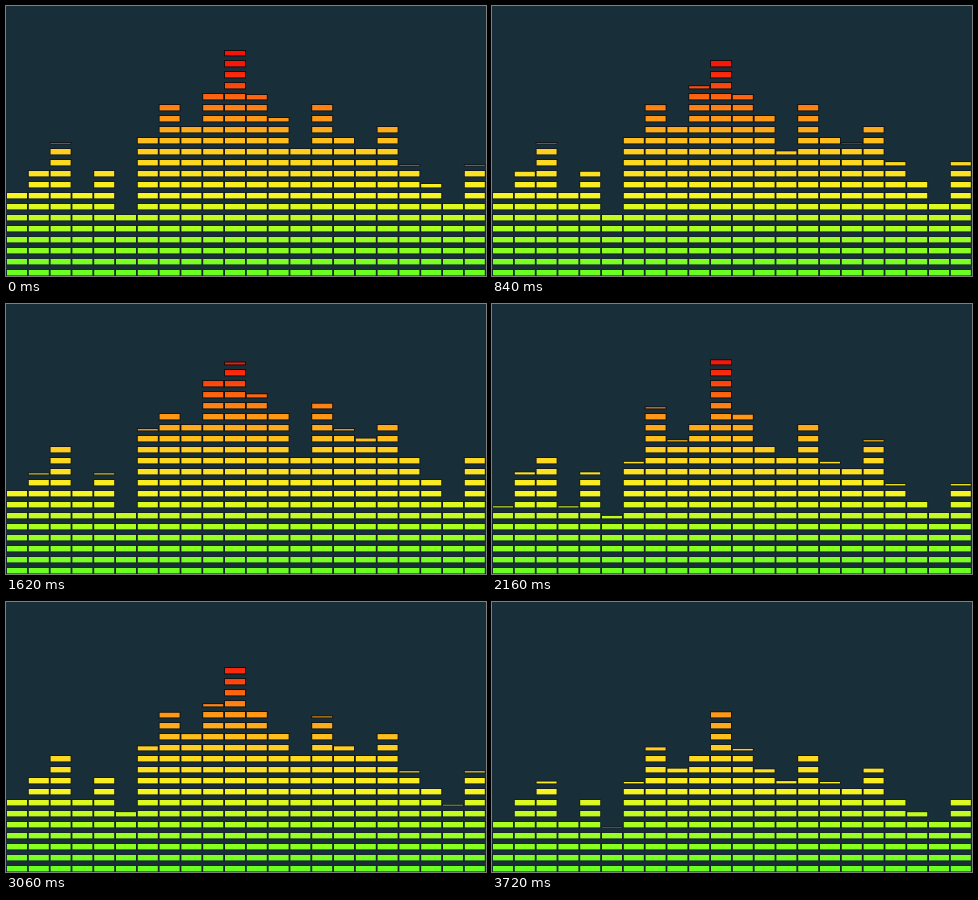
These frames come from a looping animation (480 by 270 pixels, 3780 ms). An HTML page with a canvas:

```html
<!DOCTYPE html>
<html lang="en">
<head>
<meta charset="utf-8">
<title>Equalizer</title>
<style>
  html, body { margin: 0; width: 100%; height: 100%; overflow: hidden; background: #182f3a; }
  canvas { display: block; width: 480px; height: 270px; }
</style>
</head>
<body>
<canvas id="stage" width="480" height="270"></canvas>
<script>
const ctx = document.getElementById('stage').getContext('2d');
const W = 480, H = 270, LOOP = 3780, STEP = 60;
const PITCH_X = 21.8, PITCH_Y = 11, BAR_W = 20, BAR_H = 5.4;

// Column heights at normal loudness.
const heights = [83.5, 107, 133, 83.5, 107, 66, 138.5, 175.5, 152, 185, 225,
                 181, 158, 128, 171.5, 138.5, 129.5, 152, 111, 92, 74, 111];

// Beats of the loop: time in ms, loudness, tilt from low to high columns.
const beats = [
  [0, 1, 0], [240, 1.35, 0], [540, 0.7, 0], [840, 1, -0.026],
  [1140, 1.35, -0.03], [1620, 0.993, -0.053], [1860, 0.65, 0],
  [2160, 0.88, 0.07], [2700, 1.42, -0.056], [2940, 0.7, 0],
  [3240, 1.3, 0], [3420, 0.41, 0], [3720, 0.68, 0.03], [LOOP, 1, 0]
];

const paint = ctx.createLinearGradient(0, 0, 0, H);
const stops = { 0: '#f00808', 62: '#f8180a', 105: '#ff8a14', 142: '#ffcb20',
                188: '#f8f522', 226: '#a2ff20', 270: '#66ff22' };
for (const y in stops) paint.addColorStop(y / H, stops[y]);

function soundAt(time) {
  const i = beats.findIndex(beat => beat[0] > time);
  const [t0, loud0, tilt0] = beats[i - 1];
  const [t1, loud1, tilt1] = beats[i];
  const ease = (1 - Math.cos(Math.PI * (time - t0) / (t1 - t0))) / 2;
  return {
    loudness: loud0 + (loud1 - loud0) * ease,
    tilt: tilt0 + (tilt1 - tilt0) * ease
  };
}

// Columns take turns as low, high and middle; the right side has no highs.
function bandOf(column) {
  return [-1, column < 15 ? 1 : -1, 0][column % 3];
}

function drawColumn(column, height) {
  const x = column * PITCH_X + 1;
  const top = H - height;
  for (let y = H - 6; y + BAR_H > Math.max(top, 0); y -= PITCH_Y) {
    const barTop = Math.max(y, top);
    const barHeight = y + BAR_H - barTop;
    ctx.fillStyle = `rgba(18, 6, 4, ${0.95 - y / 330})`;
    ctx.fillRect(x - 1, barTop - 1, BAR_W + 2, barHeight + 2);
    ctx.fillStyle = paint;
    ctx.fillRect(x, barTop, BAR_W, barHeight);
  }
}

function draw(now) {
  const { loudness, tilt } = soundAt(Math.floor((now % LOOP) / STEP) * STEP);
  ctx.fillStyle = '#182f3a';
  ctx.fillRect(0, 0, W, H);
  heights.forEach((height, i) => drawColumn(i, height * (loudness + tilt * bandOf(i))));
}

const start = performance.now();
function tick() {
  draw(performance.now() - start);
  requestAnimationFrame(tick);
}
tick();
</script>
</body>
</html>
```
